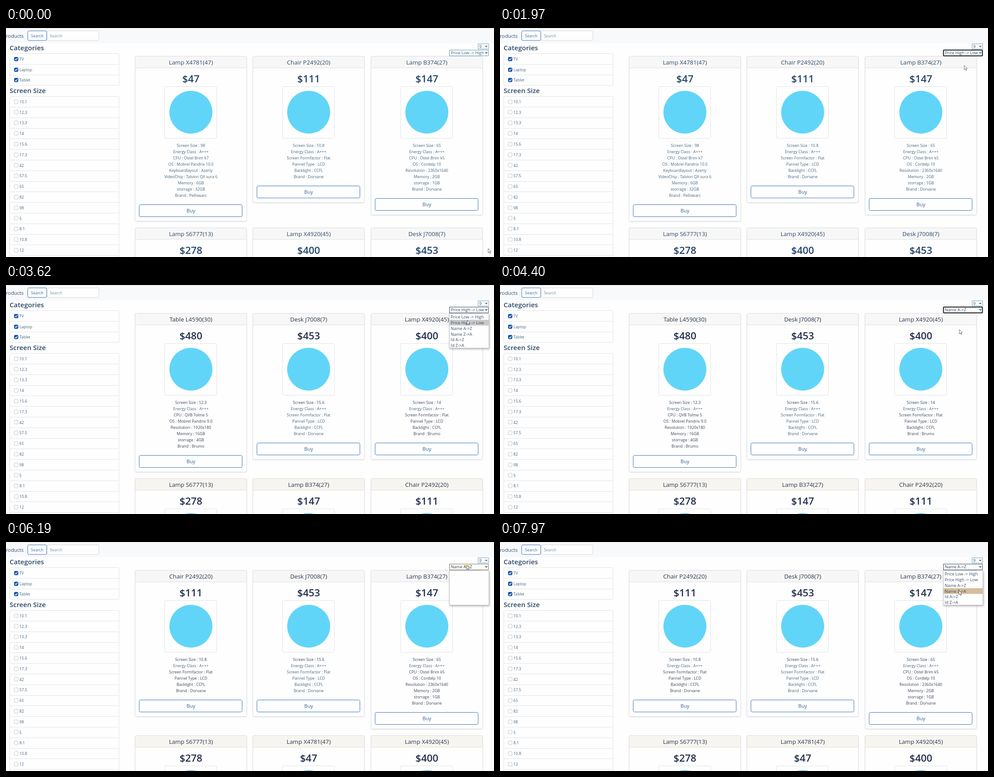
Animation, 1090 px wide and 514 px high, one loop 8000 ms. Source, as an HTML page:

```html
<!DOCTYPE html>
<html lang="en">
<head>
<meta charset="utf-8">
<title>Product list</title>
<style>
  html, body { margin: 0; width: 100%; height: 100%; overflow: hidden; background: #fefefe; }
  svg { display: block; font-family: "Open Sans", "Noto Sans", sans-serif; }
</style>
</head>
<body>
<svg id="stage" width="1090" height="514" viewBox="0 0 1090 514"></svg>
<script>
const LOOP = 8000;
const BLUE = '#46657f', DARK = '#3b4354';

const esc = s => String(s).replace(/&/g, '&amp;').replace(/</g, '&lt;').replace(/>/g, '&gt;');
const crisp = v => Math.floor(v) + .5;
const text = (x, y, s, size, fill, extra = '') =>
  `<text x="${x}" y="${y}" font-size="${size}" fill="${fill}" ${extra}>${esc(s)}</text>`;
const centred = (x, y, s, size, fill, weight = 400) =>
  text(x, y, s, size, fill, `text-anchor="middle" font-weight="${weight}"`);
const box = (x, y, w, h, fill, stroke, r = 0, extra = '') =>
  `<rect x="${x}" y="${y}" width="${w}" height="${h}" rx="${r}" fill="${fill}" stroke="${stroke}" ${extra}/>`;
const line = (x1, y1, x2, y2, stroke) => `<path d="M${x1} ${y1}L${x2} ${y2}" stroke="${stroke}"/>`;
const chevron = y => `<path d="M1070.5 ${y - 1.3}l2.2 2.4 2.2-2.4" fill="none" stroke="#2b3a4c" stroke-width="1.3"/>`;

// Products
const product = (name, price, specs = []) => ({ name, price, specs });
const flat = (size, brand) => ['Screen Size : ' + size, 'Energy Class : A+++', 'Screen Formfactor : Flat',
  'Pannel Type : LCD', 'Backlight : CCFL', 'Brand : ' + brand];
const computer = (size, ...rest) => ['Screen Size : ' + size, 'Energy Class : A+++', ...rest];

const tall = product('Lamp X4781(47)', 47, computer(98, 'CPU : Ostel Brim k7', 'OS : Mobrel Pandrix 10.0',
  'Keyboardlayout : Azerty', 'VideoChip : Talvion QX sura 6', 'Memory : 6GB', 'storrage : 32GB', 'Brand : Pellowarc'));
const chair = product('Chair P2492(20)', 111, flat('10.8', 'Dorvane'));
const lampB = product('Lamp B374(27)', 147, computer(65, 'CPU : Ostel Brim k5', 'OS : Cordelp 10',
  'Resolution : 2360x1640', 'Memory : 2GB', 'storrage : 1GB', 'Brand : Dorvane'));
const table = product('Table L4590(30)', 480, computer('12.3', 'CPU : QVB Tolme 5', 'OS : Mobrel Pandrix 9.0',
  'Resolution : 1920x180', 'Memory : 16GB', 'storrage : 4GB', 'Brand : Brumo'));
const desk = product('Desk J7008(7)', 453, flat('15.6', 'Dorvane'));
const lampX = product('Lamp X4920(45)', 400, flat('14', 'Brumo'));
const lampS = product('Lamp S6777(13)', 278);

const orders = [
  { from: 0, items: [tall, chair, lampB, lampS, lampX, desk] },
  { from: 2140, items: [table, desk, lampX, lampS, lampB, chair] },
  { from: 4470, items: [chair, desk, lampB, lampS, tall, lampX] },
];

const buttonTop = specs => crisp(284.5 + 13.95 * (specs.length - 1));
const cardBottom = specs => buttonTop(specs) + 37;

function card(item, col, top, bottom, first, specInk) {
  const x = crisp(288.5 + 263.3 * col), cx = x + 124.5, lower = top > 100;
  const warm = lower && !first;
  const edge = warm ? '#e3dccf' : '#dcdfe2';
  let s = box(x, top + .5, 249, bottom - top - .5, '#fefefe', '#dcdfe2', 3, 'filter="url(#soft)"')
    + `<path d="M${x} ${top + 26.5}v-23a3 3 0 0 1 3-3h243a3 3 0 0 1 3 3v23z" fill="${warm ? '#f7f5f0' : '#f7f7f7'}" stroke="${edge}"/>`
    + centred(cx, top + 18.8, item.name, 13.2, first ? '#2f4a66' : '#2b354a')
    + centred(cx, top + 58.7, '$' + item.price, 22.4, first ? '#24446a' : '#222f4e', 600)
    + box(cx - 58.5, top + 68.5, 116, 116, '#fefefe', '#e0e3e6', 2)
    + `<circle cx="${cx}" cy="${top + 126}" r="48" fill="#61d5f8"/>`;
  if (lower) return s;
  item.specs.forEach((t, i) => { s += centred(cx, 267.4 + 13.95 * i, t, 8.8, specInk[i]); });
  const by = buttonTop(item.specs);
  return s + box(x + 9, by, 230, 27, '#fefefe', '#3a73b4', 3) + centred(cx, by + 17.9, 'Buy', 11, '#315f92');
}

// A spec line that stays the same after sorting keeps its ink.
let inks = [[], [], []];
function board({ items }, n) {
  const rowTop = Math.ceil(Math.max(...items.slice(0, 3).map(p => cardBottom(p.specs))) + 14);
  const before = n ? orders[n - 1].items : null;
  inks = inks.map((old, c) => items[c].specs.map((t, i) =>
    !before ? BLUE : before[c].specs[i] === t ? old[i] : DARK));
  return `<g class="board">` + items.map((p, i) => i < 3
    ? card(p, i, 63, cardBottom(p.specs), !n, inks[i])
    : card(p, i - 3, rowTop, 560, !n)).join('') + '</g>';
}

// Sidebar and top bar
function checklist(top, labels, checked) {
  const pitch = 23.8;
  return box(8.5, crisp(top), 244, pitch * labels.length, '#fefefe', '#dfe2e5', 2)
    + labels.map((label, i) => {
      const y = top + pitch * i, mid = y + pitch / 2;
      return (i ? line(8.5, crisp(y), 252.5, crisp(y), '#e1e4e7') : '')
        + box(18.5, crisp(mid - 4.4), 8.5, 8.5, checked ? '#1658a8' : '#fefefe', checked ? '#1658a8' : '#c3c5c6', 2)
        + (checked ? `<path d="M20.3 ${mid}l1.9 2 3.3-4" fill="none" stroke="#fff" stroke-width="1.4"/>` : '')
        + text(30, mid + 3.2, label, 8.7, BLUE);
    }).join('');
}

const sizes = ['10.1', '12.3', '13.3', '14', '15.6', '17.3', '42', '57.5', '65', '82', '98', '5', '8.1', '10.8', '12', '13'];
const page = `<rect width="1090" height="34" fill="#f8f9fb"/><rect width="1090" height="1.2" fill="#e3e7ec"/>`
  + text(39.5, 22, 'Products', 11.3, '#36506c', 'text-anchor="end"')
  + box(91.5, 6.5, 116, 21.5, '#fefefe', '#d5d6d5', 3)
  + box(48.5, 6.5, 42.5, 21.5, '#fdfdfe', '#3a73b4', 3)
  + centred(69.8, 20.7, 'Search', 8.9, '#3a6ea6') + text(98, 20.7, 'Search', 8.8, '#6c93ac')
  + text(8, 49.8, 'Categories', 15, '#2d4966', 'font-weight="600"')
  + checklist(57.7, ['TV', 'Laptop', 'Tablet'], true)
  + text(8, 145.8, 'Screen Size', 15, '#2d4966', 'font-weight="600"')
  + checklist(153.6, sizes, false);

// Sort menu
const options = ['Price Low -> High', 'Price High -> Low', 'Name A->Z', 'Name Z->A', 'Id A->Z', 'Id Z->A'];
const ROW = 12.8, MENU_TOP = 65.3;
const controls = box(1054.5, 35.5, 23.5, 11.5, '#fefefe', '#6ba3c9') + text(1057, 44.7, '9', 9.2, '#36506c') + chevron(41.2)
  + box(990.5, 49.5, 87, 13, '#fefefe', '#5b97bd', 0, 'id="field"')
  + '<circle id="glow" cx="1029" cy="54" r="7" fill="url(#yellow)"/>'
  + text(993.5, 59.2, '', 9.25, '#36506c', 'id="value"') + chevron(55.6);
const menu = `<g id="menu">${box(990.5, 64.5, 88, 77, '#fefefe', '#c4c6c9', 0, 'filter="url(#drop)"')}`
  + `<g id="rows"><rect id="bar" x="991" width="87" height="${ROW}"/>`
  + options.map((o, i) => text(993.3, MENU_TOP + ROW * i + 9.8, o, 9.25, '#3a4c62')).join('') + '</g></g>';
const arrow = `<path id="cursor" d="M0 0v9.6l2.2-2 1.6 3.5 1.5-.7-1.6-3.4h3z" fill="#fff" stroke="#414c60" stroke-width=".8"/>`;

const stage = document.getElementById('stage');
stage.innerHTML = `<defs>
  <filter id="soft" x="-5%" y="-5%" width="110%" height="110%"><feDropShadow dx="0" dy="1.2" stdDeviation="1.2" flood-opacity=".1"/></filter>
  <filter id="drop" x="-10%" y="-10%" width="120%" height="125%"><feDropShadow dx="1" dy="2" stdDeviation="2" flood-opacity=".3"/></filter>
  <radialGradient id="yellow"><stop offset=".2" stop-color="#ece27a"/><stop offset="1" stop-color="#ece27a" stop-opacity="0"/></radialGradient>
  </defs>` + page + orders.map(board).join('') + controls + menu + arrow;

// Cursor: [first step, last step, steps, x, y]
const moves = [
  [70, 870, 12, 1040, 55], [1350, 1650, 5, 1030, 79], [1820, 1820, 1, 1037, 79], [1970, 1970, 1, 1037, 84],
  [2670, 2980, 5, 1035, 59], [3530, 3770, 4, 1025, 99], [3840, 3920, 2, 1020, 94], [4230, 4230, 1, 1026, 95],
  [4400, 4400, 1, 1026, 100], [5340, 5565, 4, 1056, 50], [5640, 5790, 3, 1029, 52],
  [6650, 7190, 8, 1025, 107], [7490, 7660, 3, 1025, 108], [7970, 7970, 1, 1025, 109],
];
const path = [[0, 1077, 495]];
for (const [t0, t1, n, x, y] of moves) {
  const [, x0, y0] = path[path.length - 1];
  for (let k = 1; k <= n; k++) {
    const p = k / n, e = p * p * (3 - 2 * p);
    path.push([n > 1 ? t0 + (t1 - t0) * (k - 1) / (n - 1) : t0, x0 + (x - x0) * e, y0 + (y - y0) * e]);
  }
}

// [time, chosen option, menu (0 shut, 1 blank, 2 filled), border colour, border width]
const states = [
  [0, 0, 0, '#5b97bd', 1], [980, 0, 0, '#3c6398', 1], [1060, 0, 1, '#3c6398', 1], [1140, 0, 2, '#3c6398', 1],
  [1970, 1, 0, '#15181d', 2], [3130, 1, 1, '#34465f', 1], [3230, 1, 2, '#34465f', 1],
  [4400, 2, 0, '#15181d', 2], [6190, 2, 1, '#7d7850', 1], [6250, 2, 2, '#34465f', 1],
];

const latest = (list, t) => list.reduce((a, b) => b[0] <= t + .01 ? b : a);
const el = id => document.getElementById(id);
const [field, value, glow, menuEl, rows, bar, cursor] =
  ['field', 'value', 'glow', 'menu', 'rows', 'bar', 'cursor'].map(el);
const boards = [...document.querySelectorAll('.board')];
const show = (node, on) => node.setAttribute('display', on ? 'inline' : 'none');

function draw(t) {
  const [, x, y] = latest(path, t);
  cursor.setAttribute('transform', `translate(${x.toFixed(1)} ${y.toFixed(1)})`);

  const [, chosen, open, colour, width] = latest(states, t);
  field.setAttribute('stroke', colour);
  field.setAttribute('stroke-width', width);
  field.setAttribute('rx', width > 1 ? 1.5 : 0);
  value.textContent = options[chosen];
  value.setAttribute('fill', t < 980 ? '#3d5e7c' : '#36465c');
  show(glow, t >= 6190 && t < 6250);
  show(menuEl, open > 0);
  show(rows, open > 1);

  const hovered = y > MENU_TOP ? Math.floor((y - MENU_TOP) / ROW) : chosen;
  bar.setAttribute('y', MENU_TOP + ROW * hovered);
  bar.setAttribute('fill', t < 6250 ? '#c9c9c9' : '#d5bd9c');

  const current = orders.filter(o => o.from <= t).length - 1;
  boards.forEach((b, i) => show(b, i === current));
}

const start = performance.now();
function tick() {
  draw((performance.now() - start) % LOOP);
  requestAnimationFrame(tick);
}
tick();
</script>
</body>
</html>
```
